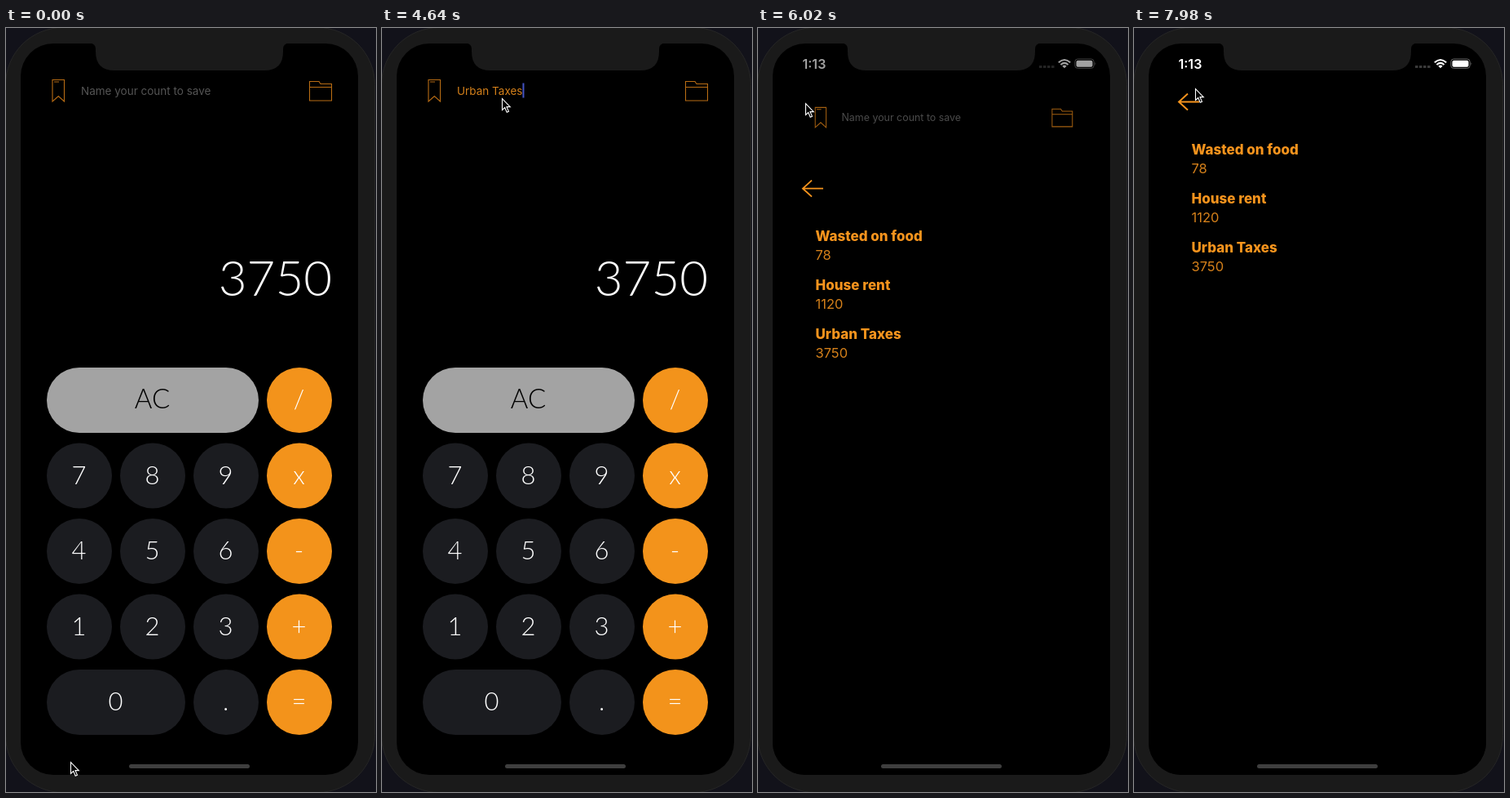
Recreate the animation shown at these times as an HTML page. Size 454 px wide and 936 px high, loop 8 s.

```html
<!DOCTYPE html>
<html lang="en">
<head>
<meta charset="utf-8">
<title>Calculator</title>
<style>
  html, body { margin: 0; width: 100%; height: 100%; overflow: hidden; background: #12121a; }
  svg { display: block; width: 100vw; height: 100vh; }
  text { white-space: pre; font-family: Inter, "Noto Sans", sans-serif; }
  #calc text { font-family: Lato, "Open Sans", sans-serif; font-weight: 300; text-anchor: middle; font-size: 31px; }
  #calc .total { font-size: 60px; text-anchor: end; fill: #fff; }
  #calc .clear { font-size: 33px; }
  #name { font-size: 13.5px; }
  .title { font-size: 17px; font-weight: 800; fill: #f7941d; }
  .value { font-size: 16.5px; fill: #d5801a; }
  .line { fill: none; stroke: #b86c14; stroke-width: 1.1; }
</style>
</head>
<body>
<svg viewBox="0 0 454 936">
  <clipPath id="screen"><rect x="18" y="19" width="414" height="896" rx="40"/></clipPath>
  <rect x="-.5" y="-.5" width="453" height="937" rx="70" fill="#1a1a1a" stroke="#262626"/>
  <rect x="18" y="19" width="414" height="896" rx="40"/>

  <g clip-path="url(#screen)">
    <g id="main">
      <path class="line" d="M57 63.5H71.5V90L64.3 83.5L57 90ZM59 66H65"/>
      <path class="line" d="M372.5 89V65.5H384L386 68.5H399.5V89ZM372.5 72.5H399.5"/>
      <text id="name" x="92" y="81.5"></text>
      <rect id="caret" y="67.5" width="2" height="18" fill="#4453c4"/>
      <g id="calc"><text class="total" x="400" y="328">3750</text></g>
    </g>
    <g id="sheet">
      <rect x="18" y="73" width="414" height="900"/>
      <path d="M66 80.5L55 90.5L66 100.5M55 90.5H80" fill="none" stroke="#f7941d" stroke-width="1.9"/>
    </g>
    <g id="status" fill="#fff">
      <text x="54.5" y="49.5" font-size="16" font-weight="600">1:13</text>
      <path d="M345 47.5H364" stroke="#3a3a3a" stroke-width="3" stroke-dasharray="3.5 1.5"/>
      <path d="M368.8 42.3Q376 35.7 383.2 42.3M371.4 45Q376 40.8 380.6 45" fill="none" stroke="#fff" stroke-width="2"/>
      <path d="M373.3 46.6Q376 44.4 378.7 46.6L376 49.3Z"/>
      <rect x="388.8" y="38" width="23.4" height="11.4" rx="3.5" fill="none" stroke="#666"/>
      <rect x="390.5" y="39.7" width="20" height="8" rx="2"/>
      <path d="M413.5 42Q415.3 43.7 413.5 45.4Z" fill="#666"/>
    </g>
  </g>

  <path d="M103 18.5Q110 19 110 26V29Q110 52 133 52H317Q340 52 340 29V26Q340 19 347 18.5Z" fill="#1a1a1a"/>
  <rect x="151" y="902" width="148" height="5" rx="2.5" fill="#3e3e3e"/>
  <path id="cursor" d="M.5 .5V14.5L3.7 11.5L6.2 17.2L8.5 16.2L6 10.6H10.3Z" fill="#000" stroke="#fff" stroke-width="1.1"/>
</svg>

<script>
const $ = id => document.getElementById(id);
const [main, nameText, caret, calc, sheet, status, cursor] =
  ["main", "name", "caret", "calc", "sheet", "status", "cursor"].map($);

function add(parent, tag, attributes, content = "") {
  const node = document.createElementNS("http://www.w3.org/2000/svg", tag);
  for (const key in attributes) node.setAttribute(key, attributes[key]);
  node.textContent = content;
  parent.append(node);
}

function button(label, column, row, span, fill, ink) {
  const x = 50 + column * 90, y = 416 + row * 92.5, width = span * 90 - 10;
  add(calc, "rect", { x, y, width, height: 80, rx: 40, fill });
  add(calc, "text", { x: x + width / 2 - 0.5, y: y + 50.3, fill: ink,
    class: label === "AC" ? "clear" : "" }, label);
}

const dark = "#1b1c20";
button("AC", 0, 0, 3, "#a3a3a3", "#000");
["789", "456", "123"].forEach((keys, row) =>
  [...keys].forEach((key, column) => button(key, column, row + 1, 1, dark, "#fff")));
button("0", 0, 4, 2, dark, "#fff");
button(".", 2, 4, 1, dark, "#fff");
[..."/x-+="].forEach((key, row) => button(key, 3, row, 1, "#f3931b", "#fff"));

[["Wasted on food", 78], ["House rent", 1120], ["Urban Taxes", 3750]].forEach(([title, value], i) => {
  add(sheet, "text", { x: 70.5, y: 155 + i * 60, class: "title" }, title);
  add(sheet, "text", { x: 70.5, y: 177.7 + i * 60, class: "value" }, value);
});

const LOOP = 8000, FOCUS = 1340, SUBMIT = 4900, PRESENT = 5778;
const entry = "Urban Taxes";
const keyTimes = [2100, 2330, 2540, 2750, 2950, 3150, 3600, 3820, 4040, 4260, 4480];
// time, x, y of the pointer tip
const pointer = [
  [40, 79, 899], [1150, 147, 86], [5000, 147, 86], [5520, 61, 80], [5760, 61, 80],
  [6020, 58, 92], [6340, 98, 197], [6500, 100, 200], [7300, 100, 200],
  [7440, 99, 185], [7820, 71, 79], [7980, 75, 74]
];

const clamp = v => Math.max(0, Math.min(1, v));
const smooth = v => v * v * (3 - 2 * v);

function pointerAt(t) {
  const next = pointer.findIndex(p => p[0] > t);
  if (next < 1) return (next ? pointer.at(-1) : pointer[0]).slice(1);
  const a = pointer[next - 1], b = pointer[next];
  const k = smooth((t - a[0]) / (b[0] - a[0]));
  return [a[1] + (b[1] - a[1]) * k, a[2] + (b[2] - a[2]) * k];
}

function render(t) {
  const typed = t < PRESENT ? entry.slice(0, keyTimes.filter(k => k <= t).length) : "";
  nameText.textContent = typed || "Name your count to save";
  nameText.setAttribute("fill", typed ? "#d5801a" : "#545454");
  const typing = t >= FOCUS && t < SUBMIT;
  caret.style.display = typing ? "" : "none";
  if (typing) caret.setAttribute("x", 92 + (typed ? nameText.getComputedTextLength() : 0));

  // critically damped spring
  const s = Math.max(0, t - PRESENT) * 0.0148;
  const rest = (1 + s) * Math.exp(-s), shown = 1 - rest;
  sheet.setAttribute("transform", `translate(0 ${842 * rest})`);
  main.setAttribute("transform",
    `translate(225 ${467.5 + 2.4 * shown}) scale(${1 - 0.09 * shown}) translate(-225 -467.5)`);
  main.setAttribute("opacity", 1 - 0.12 * shown);
  status.setAttribute("opacity", clamp((t - 5800) / 350));
  cursor.setAttribute("transform", `translate(${pointerAt(t)})`);
}

function tick() {
  render(performance.now() % LOOP);
  requestAnimationFrame(tick);
}
tick();
</script>
</body>
</html>
```
